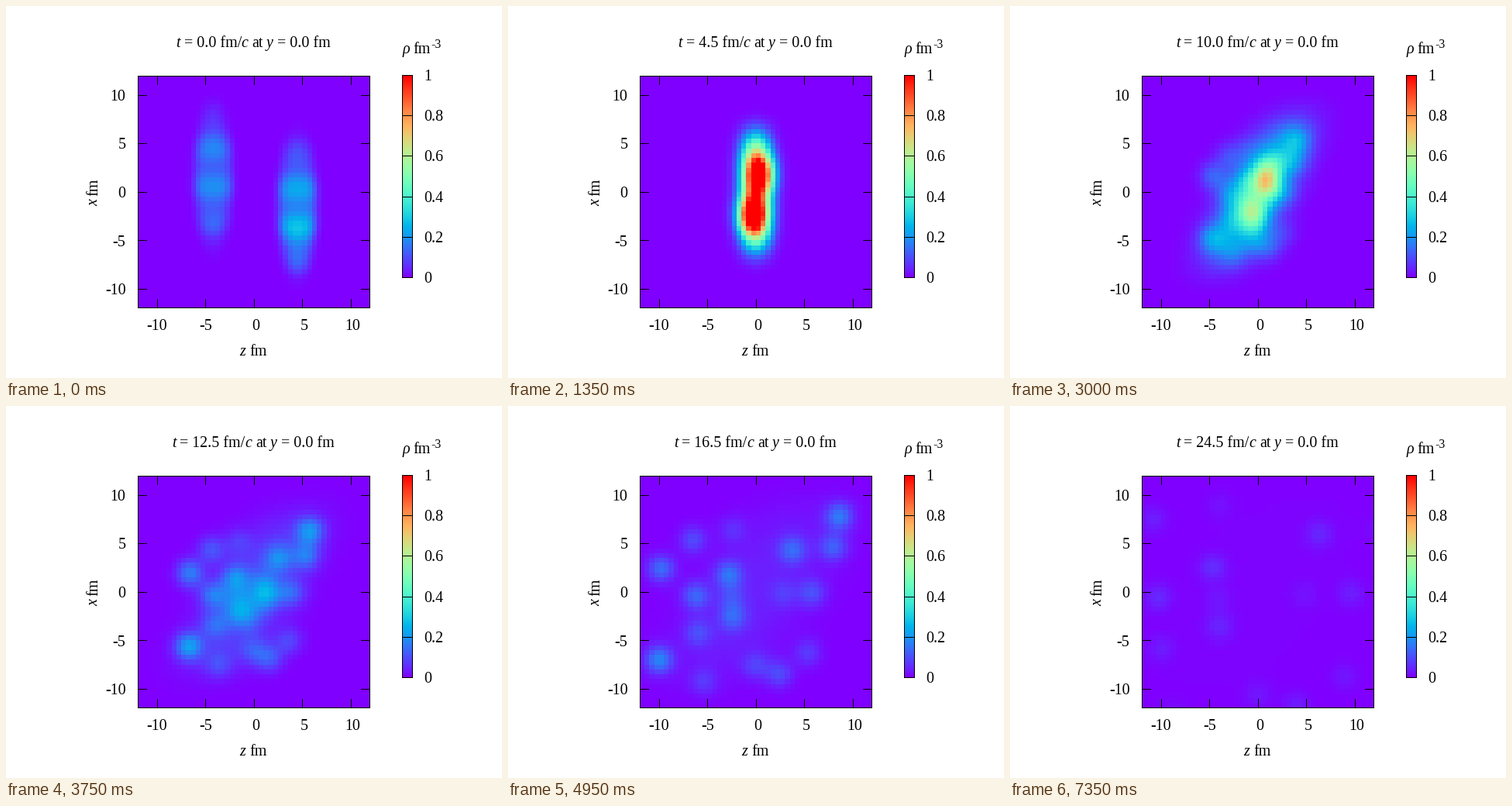
Recreate the animation shown at these times as a matplotlib script. Size 640 by 480 pixels, loop 7500 ms.

```python
import numpy as np
import matplotlib.pyplot as plt
from matplotlib.animation import FuncAnimation

FRAMES, INTERVAL, DT = 50, 150, 0.5
LEFT, TOP, SIDE, HALF, CELLS = 170, 90, 300, 12, 48
EM = 20
CONTACT, BURST = 4.5, 16.5
SPEED = 0.9

plt.rcParams["font.family"] = "Liberation Serif"

# Fragments at the burst time: z, x, peak density
FRAGMENTS = np.array([
    (-9.8, 2.4, .14), (-10, -7, .17), (-6.2, -.4, .12), (-2.8, 1.8, .13),
    (-2.4, -2.6, .1), (-6, -4.2, .08), (-6.5, 5.4, .09), (-2.4, 6.4, .05),
    (3.8, 4.3, .11), (8.6, 7.8, .15), (8, 4.6, .11), (5.8, -.1, .09),
    (2.9, -.2, .05), (5.4, -6.3, .07), (0, -7.6, .07), (2.4, -8.5, .09),
    (-5.4, -9.3, .06), (-2.5, -.6, .06),
]).T

edge = HALF - HALF / CELLS
axis = np.linspace(-edge, edge, CELLS)
Z, X = np.meshgrid(axis, axis[::-1])


def ramp(t, start, end):
    return np.clip((t - start) / (end - start), 0, 1)


def key(t, *values):
    return np.interp(t, (1.5, CONTACT, 8, 12.5, BURST, 24.5), values)


def spot(z, x, peak, wz=1, wx=1):
    return peak * np.exp(-((Z - z) / wz) ** 2 / 2 - ((X - x) / wx) ** 2 / 2)


def slab(z, x, peak):
    r2 = ((Z - z) / 2) ** 2 + ((X - x) / 6.4) ** 2
    return peak * np.exp(-r2 ** 2) * (1 + 0.2 * np.cos(1.5 * (X - 0.5)))


def nuclei(t):
    u = ramp(t, 1.5, CONTACT)
    left = slab(-4.2 + SPEED * t, 1.5, 0.16)
    right = slab(4.5 - SPEED * t, -1.1, 0.2 - 0.012 * X)
    return (1 - u * u * (3 - 2 * u)) * (left + right)


def fireball(t):
    """Compressed column that shears, widens and thins out."""
    age = t - CONTACT
    shear = 0.55 * (1 - np.exp(-max(age, 0) / 3))
    width = np.hypot(1.1, 0.36 * age)
    length = 5.8 + 0.3 * age
    column = np.exp(-((Z - shear * X) / width) ** 2 / 2 - (X / length) ** 4)
    upper = spot(0.5 + 0.06 * age, key(t, 1.8, 1.8, 2.2, 0, 0, 0),
                 key(t, 0, .55, .7, .15, 0, 0), 1, 1.3)
    lower = spot(-0.4, -2.4, key(t, 0, .65, .48, .06, 0, 0), 1, 1.3)
    return key(t, 0, .8, .38, .08, .04, .006) * column + upper + lower


def fragments(t):
    """Clumps carried outwards by the expansion while they fade."""
    gain = ramp(t, 7, 14.5) * np.exp((BURST - t) / 9)
    flow_z = np.hypot(1.5, t - CONTACT) / np.hypot(1.5, BURST - CONTACT)
    flow_x = (t + 4) / (BURST + 4)
    return sum(spot(z * flow_z, x * flow_x, peak * gain)
               for z, x, peak in FRAGMENTS.T)


def density(t):
    return nuclei(t) + fireball(t) + fragments(t)


fig = plt.figure(figsize=(6.4, 4.8), dpi=100, facecolor="white")
ax = fig.add_axes([0, 0, 1, 1])
ax.axis("off")


def label(x, y, s, italic=False, size=EM, **kw):
    return ax.text(x, y, s, fontsize=size * 0.72, va="baseline",
                   style="italic" if italic else "normal",
                   rotation_mode="anchor", **kw)


def line(xs, ys):
    ax.plot(xs, ys, color="black", lw=0.72, snap=False,
            solid_capstyle="projecting", solid_joinstyle="miter")


def box(x0, y0, x1, y1):
    line([x0, x1, x1, x0, x0], [y0, y0, y1, y1, y0])


heat = ax.imshow(density(0), cmap="rainbow", vmin=0, vmax=1, aspect="auto",
                 interpolation="nearest",
                 extent=(LEFT, LEFT + SIDE, TOP + SIDE, TOP))
ax.imshow(np.linspace(1, 0, 128)[:, None], cmap="rainbow", aspect="auto",
          interpolation="nearest", extent=(511, 525, 351, 89))

x0, y0, x1, y1 = LEFT + .5, TOP + .5, LEFT + SIDE - .5, TOP + SIDE - .5
box(x0, y0, x1, y1)
for v in range(-10, 11, 5):
    px = LEFT + (v + HALF) * SIDE / (2 * HALF)
    py = TOP + (HALF - v) * SIDE / (2 * HALF)
    for a, b in ((x0, x0 + 11), (x1 - 11, x1)):
        line([a, b], [int(py) + .5] * 2)
    for a, b in ((y0, y0 + 11), (y1 - 11, y1)):
        line([int(px) + .5] * 2, [a, b])
    label(px + (2 if v >= 0 else 0), 418, str(v), ha="center")
    label(154.5, py + 7, str(v), ha="right")

box(511.5, 89.5, 524.5, 350.5)
for i in range(6):
    py = 350.5 - 261 * i / 5
    line([511.5, 524.5], [int(py) + .5] * 2)
    label(539.5, py + 6.5, f"{i / 5:g}")

label(301.5, 451, "z", True)
label(314, 451, "fm")
label(118, 258.5, "x", True, rotation=90)
label(118, 244.6, "fm", rotation=90)
label(511.5, 61, "ρ", True)
label(525.5, 61, "fm")
label(548, 53.5, "-3", size=16)

before = [(219, label(219, 53, "t", True)), (229.5, label(229.5, 53, ""))]
after = [(x, label(x, 53, s, it)) for x, s, it in (
    (303.5, "c", True), (317, "at", False),
    (335.5, "y", True), (350, "= 0.0 fm", False))]

ax.set_xlim(0, 640)
ax.set_ylim(480, 0)


def update(n):
    t = n * DT
    heat.set_data(density(t))
    before[1][1].set_text(f"= {t:.1f} fm/")
    shift = 5 if t >= 10 else 0
    for x, txt in before:
        txt.set_x(x - shift)
    for x, txt in after:
        txt.set_x(x + shift)


anim = FuncAnimation(fig, update, frames=FRAMES, interval=INTERVAL,
                     init_func=lambda: update(0), repeat=True, repeat_delay=0)
plt.show()
```
